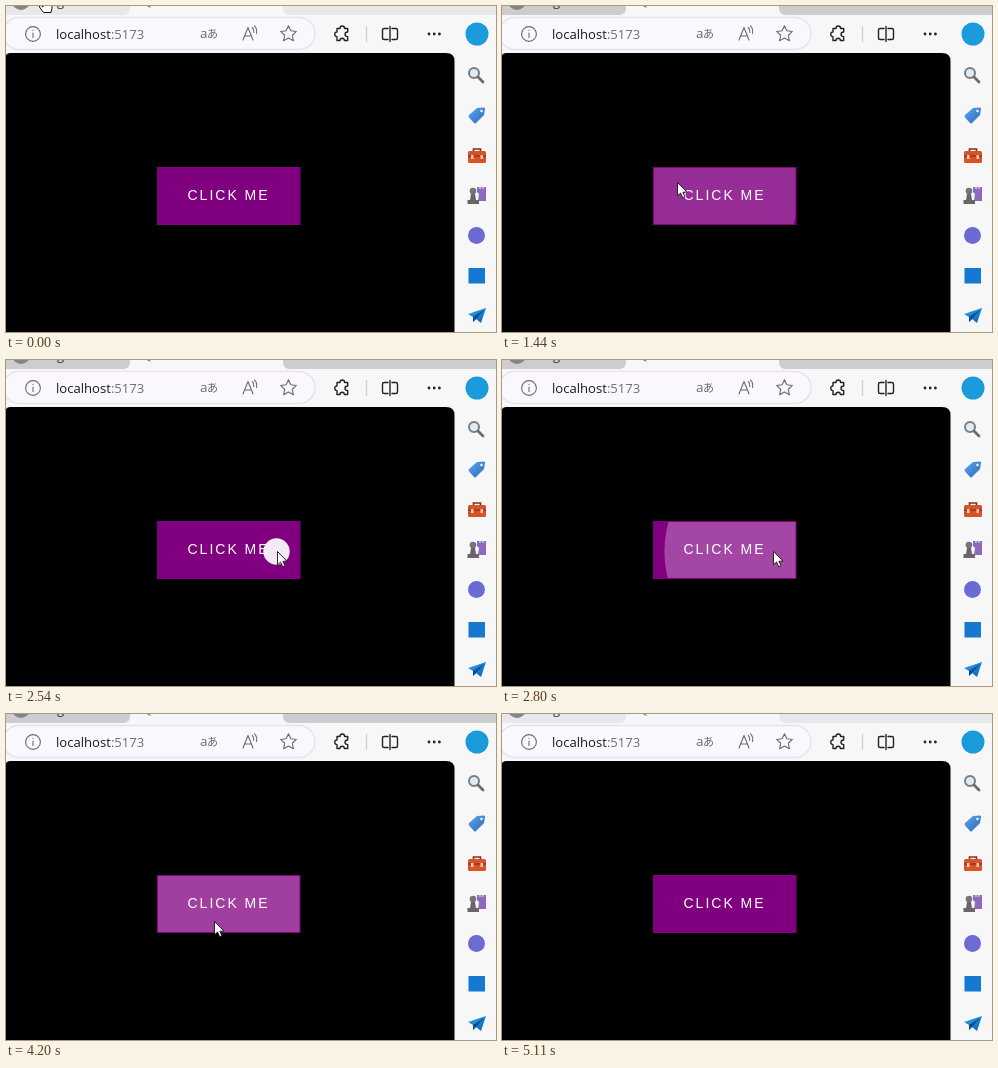
These frames come from a looping animation (490x326 px, 5.17 s). An HTML page:

```html
<!DOCTYPE html>
<html lang="en">
<head>
<meta charset="utf-8">
<title>Ripple button</title>
<style>
  html, body { margin: 0; width: 100%; height: 100%; overflow: hidden; background: #f7f7f7; }
  svg { display: block; width: 490px; height: 326px; }
  .ui { font-family: "Open Sans", "Noto Sans", sans-serif; }
  .line { fill: none; stroke: #6b6b6b; stroke-width: 1.1; stroke-linecap: round; stroke-linejoin: round; }
  .dark { stroke: #222; stroke-width: 1.4; }
  .label { font: 14px "Liberation Sans", Arial, sans-serif; letter-spacing: 2px; fill: #fff; }
</style>
</head>
<body>
<svg viewBox="0 0 490 326">
  <defs>
    <clipPath id="inside"><rect x="152" y="162" width="141.5" height="56"/></clipPath>
    <linearGradient id="tagBlue" x2="1" y2="1"><stop stop-color="#62a8ee"/><stop offset="1" stop-color="#2868bf"/></linearGradient>
    <linearGradient id="planeBlue" x2="1" y2="1"><stop stop-color="#2fa8ee"/><stop offset="1" stop-color="#0a5fb4"/></linearGradient>
  </defs>
  <rect width="490" height="326" fill="#f7f7f7"/>

  <!-- tab strip -->
  <g id="strip">
    <path d="M0 0H124V2Q124 9 117 9H0Z"/>
    <path d="M277 0H490V9H284Q277 9 277 2Z"/>
  </g>
  <circle cx="15" cy="-5" r="9" fill="#858585"/>
  <text class="ui" x="51" y="-.5" font-size="13" fill="#333">g</text>
  <path class="line" d="M142 0L144 1"/>

  <!-- toolbar -->
  <rect x="-3" y="11.5" width="312" height="32" rx="16" fill="#faf8fc" stroke="#e9e1f3" stroke-width="1.5"/>
  <g class="line">
    <circle cx="27" cy="28" r="7.4"/>
    <path d="M27 27V31.5M27 24.3V24.5"/>
    <path d="M237 34L242 21.5L247 34M238.7 30H245.3M246.3 21.5Q248.3 23.5 247.8 26.5M248.5 19.8Q251.5 23 250.5 27.5"/>
    <path id="star"/>
  </g>
  <text class="ui" x="50" y="33" font-size="13.1" fill="#1b1b1b">localhost<tspan fill="#6f6f6f">:5173</tspan></text>
  <text x="194" y="32" font-size="13.5" fill="#6b6b6b" font-family="'Open Sans', sans-serif">a</text>
  <text x="201" y="32" font-size="11" fill="#6b6b6b" font-family="'Noto Sans CJK JP', 'Noto Sans CJK', sans-serif">あ</text>
  <path class="line dark" d="M331 22.5H334Q334 20 336.3 20T338.6 22.5H341.7V26Q339 26 339 28.3T341.7 30.6V34.5H338.4Q338.4 32.3 336.2 32.3T334 34.5H331V30.6Q328.8 30.6 328.8 28.3T331 26Z"/>
  <path d="M360.5 20V36" stroke="#cfcfcf" stroke-width="1.3"/>
  <path class="line dark" d="M382 22.5H378Q376.5 22.5 376.5 24V32Q376.5 33.5 378 33.5H382M386 22.5H390Q391.5 22.5 391.5 24V32Q391.5 33.5 390 33.5H386M384 20.5V35.5"/>
  <g fill="#222"><circle cx="423" cy="28" r="1.4"/><circle cx="428.2" cy="28" r="1.4"/><circle cx="433.4" cy="28" r="1.4"/></g>

  <!-- sidebar -->
  <circle cx="471" cy="28" r="11.5" fill="#1c9bdc"/>
  <circle cx="468" cy="67" r="5" fill="#dcecf7" stroke="#7b7b80" stroke-width="2"/>
  <path d="M472 71L477 76" stroke="#6a6a70" stroke-width="2.8" stroke-linecap="round"/>
  <path d="M463 109L471 102L478 101.5Q479.5 101.5 479 103L478 109L470 117Q469 118 468 117L463 111.500Q462 110 463 109Z" fill="url(#tagBlue)"/>
  <circle cx="475.500" cy="105" r="1.300" fill="#e7f2fc"/>
  <path d="M467.500 145V143H474.500V145" fill="none" stroke="#843016" stroke-width="1.700"/>
  <rect x="462" y="145" width="18" height="12" rx="1.500" fill="#d65427"/>
  <path d="M462 150H480" stroke="#983519" stroke-width="1.500"/>
  <rect x="465" y="149" width="2.500" height="4" fill="#f3c8ae"/>
  <rect x="474.500" y="149" width="2.500" height="4" fill="#f3c8ae"/>
  <path d="M471 181V186L473 188L472 195H480V188V181H477.500V183H476.500V181H474.500V183H473.500V181Z" fill="#8f69bd"/>
  <circle cx="467" cy="185" r="3.300" fill="#74747a"/>
  <path d="M465 188H469L470 194H473V198H461.500V194H464Z" fill="#66666c"/>
  <circle cx="470.500" cy="229.500" r="8.500" fill="#6c6bd4"/>
  <rect x="462.500" y="262" width="16.500" height="15.500" fill="#1479cf"/>
  <path d="M462 308L480 302L475 317L470 313L467 316L467 311Z" fill="url(#planeBlue)"/>
  <path d="M467 311L478 304L470 313L467 316Z" fill="#084c93"/>

  <!-- page -->
  <path d="M0 326V49Q1.500 47 4 47H440Q448.500 47 448.500 55V326Z"/>
  <rect x="151" y="161" width="143.500" height="58" fill="#800080"/>
  <text class="label" x="181.500" y="194">CLICK ME</text>
  <g clip-path="url(#inside)"><circle id="ripple" fill="#fff"/></g>

  <path id="hand" fill="#fff" stroke="#111" d="M37 -8Q39 -10 40.500 -8V-2L45 -.5Q46.500 0 46 2L45 6.500H37.500L33.500 1Q33 -1 35 -.5L37 1Z"/>
  <path id="arrow" fill="#fff" stroke="#111" stroke-width=".9" d="M0 0V13.300L3.100 10.500L5.100 15.200L7.400 14.200L5.400 9.700H9.500Z"/>
</svg>
<script>
const LOOP = 5170;
const $ = id => document.getElementById(id);
const set = (el, attrs) => Object.entries(attrs).forEach(([k, v]) => el.setAttribute(k, v));

// start, duration, removal time, centre
const ripples = [
  { start: 1120, span: 500, end: 1620, x: 175, y: 177 },
  { start: 2512, span: 541, end: 3040, x: 270.5, y: 191.500 },
  { start: 3944, span: 453, end: 4490, x: 208, y: 207 }
];
const moves = [
  { from: 160, to: 630, a: [39, 0], b: [182, 188] },
  { from: 730, to: 810, a: [182, 188], b: [175.500, 176.500] },
  { from: 1600, to: 2070, a: [175.500, 176.500], b: [263, 196] },
  { from: 2130, to: 2230, a: [263, 196], b: [271.500, 191.500] },
  { from: 3120, to: 3590, a: [271.500, 191.500], b: [208.500, 207.500] },
  { from: 4520, to: 4950, a: [208.500, 207.500], b: [310, 330] }
];

// CSS ease-out: cubic-bezier(0, 0, .58, 1)
function easeOut(x) {
  let lo = 0, hi = 1;
  for (let i = 0; i < 20; i++) {
    const s = (lo + hi) / 2;
    if (1.74 * (1 - s) * s * s + s ** 3 < x) lo = s; else hi = s;
  }
  return 3 * (1 - lo) * lo * lo + lo ** 3;
}

function cursorAt(t) {
  const { from, to, a, b } = moves.findLast(m => t >= m.from) || moves[0];
  const p = Math.min(1, Math.max(0, (t - from) / (to - from)));
  const k = p * p * (3 - 2 * p);
  return a.map((v, i) => v + (b[i] - v) * k);
}

function draw(t) {
  const focused = t >= 1060 && t < 5110;
  set($("strip"), { fill: focused ? "#cdcdcd" : "#e8e8e8" });

  const r = ripples.find(q => t >= q.start && t < q.end);
  const grow = r ? easeOut(Math.min(1, (t - r.start) / r.span)) : 0;
  set($("ripple"), { cx: r ? r.x : 0, cy: r ? r.y : 0, r: 150 * grow, opacity: r ? 1 - grow : 0 });

  const onTab = t < 160;
  set($("hand"), { visibility: onTab ? "visible" : "hidden" });
  set($("arrow"), { visibility: onTab ? "hidden" : "visible", transform: `translate(${cursorAt(t)})` });
}

const starPoints = Array.from({ length: 10 }, (_, i) => {
  const angle = (i / 5 - 0.5) * Math.PI, radius = i % 2 ? 4 : 8.3;
  return `${282.5 + radius * Math.cos(angle)} ${28 + radius * Math.sin(angle)}`;
});
set($("star"), { d: `M${starPoints.join("L")}Z` });

const began = performance.now();
function tick() {
  draw((performance.now() - began) % LOOP);
  requestAnimationFrame(tick);
}
tick();
</script>
</body>
</html>
```
